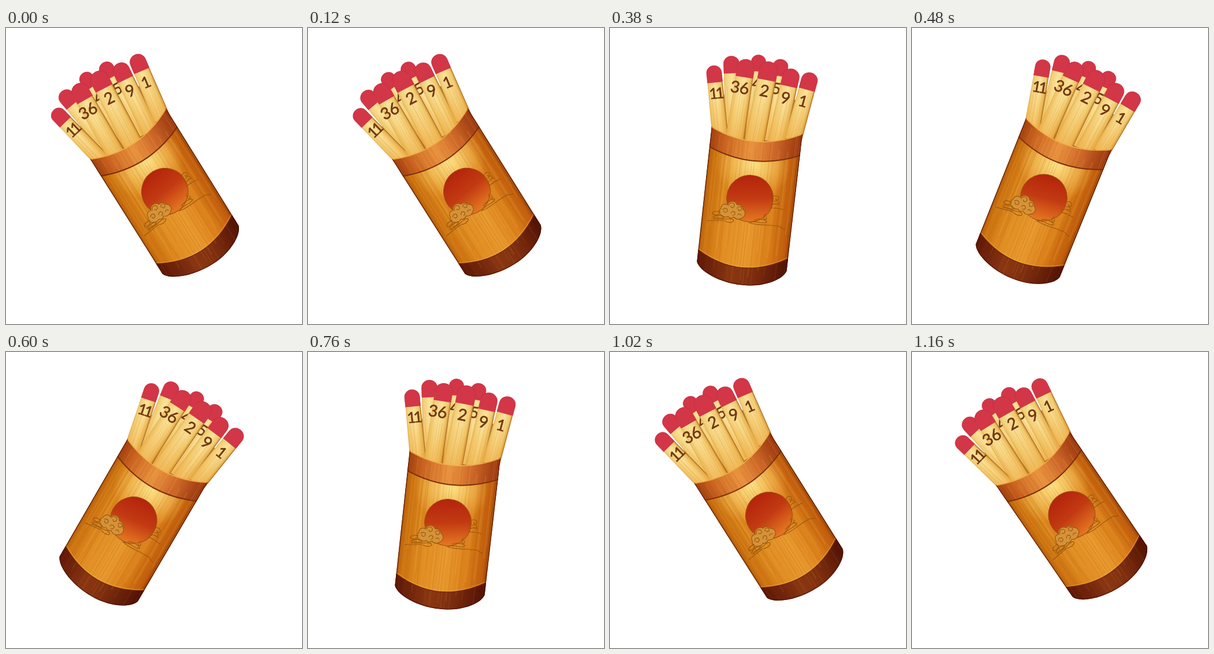
These frames come from a looping animation (512 px wide and 512 px high, 1180 ms). An HTML page:

```html
<!DOCTYPE html>
<html>
<head>
<meta charset="utf-8">
<style>
  html, body { margin: 0; width: 100%; height: 100%; overflow: hidden; background: #fff; }
  svg { display: block; width: 100vw; height: 100vh; }
  text { font-family: Lato, "Open Sans", sans-serif; fill: #70360f; stroke: #70360f; stroke-width: .6; text-anchor: middle; }
</style>
</head>
<body>
<svg viewBox="0 0 512 512">
  <defs>
    <linearGradient id="wood">
      <stop offset="0" stop-color="#e0b056"/><stop offset=".12" stop-color="#f3cf78"/>
      <stop offset=".5" stop-color="#fbe39a"/><stop offset=".85" stop-color="#f0c86c"/>
      <stop offset="1" stop-color="#bf7c28"/>
    </linearGradient>
    <linearGradient id="depth" x2="0" y2="1">
      <stop offset=".4" stop-color="#f0a028" stop-opacity="0"/>
      <stop offset="1" stop-color="#e89a28" stop-opacity=".5"/>
    </linearGradient>
    <linearGradient id="body">
      <stop offset="0" stop-color="#a04a08"/><stop offset=".04" stop-color="#cb7210"/>
      <stop offset=".25" stop-color="#de8a20"/><stop offset=".5" stop-color="#e8992e"/>
      <stop offset=".75" stop-color="#da7f1a"/><stop offset=".95" stop-color="#c05c0c"/>
      <stop offset="1" stop-color="#8e3a05"/>
    </linearGradient>
    <radialGradient id="glow" gradientUnits="userSpaceOnUse" cx="0" cy="0" r="1"
      gradientTransform="translate(6 -8) scale(66 62)">
      <stop offset="0" stop-color="#fde488"/><stop offset=".4" stop-color="#fbd878" stop-opacity=".7"/>
      <stop offset="1" stop-color="#f8c860" stop-opacity="0"/>
    </radialGradient>
    <linearGradient id="rim">
      <stop offset="0" stop-color="#a0400f"/><stop offset=".15" stop-color="#c8601f"/>
      <stop offset=".45" stop-color="#ea9440"/><stop offset=".7" stop-color="#d06a2a"/>
      <stop offset="1" stop-color="#98340e"/>
    </linearGradient>
    <linearGradient id="base">
      <stop offset="0" stop-color="#5c1606"/><stop offset=".4" stop-color="#8a3612"/>
      <stop offset=".65" stop-color="#7c2c0e"/><stop offset="1" stop-color="#501104"/>
    </linearGradient>
    <linearGradient id="sun" x1=".45" y1="0" x2=".58" y2="1">
      <stop offset="0" stop-color="#b4240c"/><stop offset=".5" stop-color="#c23a12"/>
      <stop offset="1" stop-color="#e67a22"/>
    </linearGradient>
    <clipPath id="tubeClip"><path d="M-73-64Q6-28 85-69L84 170C78 188 44 203 10 203C-30 203-66 187-72 171Z"/></clipPath>
  </defs>
  <g id="cup">
    <path d="M187 115L335 125L328 200L182 195Z" fill="#b8792c"/>
    <g id="sticks"></g>
    <g transform="translate(241 242) rotate(6.4)">
      <g clip-path="url(#tubeClip)">
        <path d="M-73-40H85V185H-73Z" fill="url(#body)"/>
        <path d="M-73-40H85V80H-73Z" fill="url(#glow)"/>
        <path d="M-73-64Q6-28 85-69V-31Q6 4-73-29Z" fill="url(#rim)"/>
        <path d="M-73 150Q6 197 85 148V210H-73Z" fill="url(#base)"/>
        <g id="grain"></g>
        <g fill="none">
          <path d="M-73-64Q6-28 85-69" stroke="#f0b04a" stroke-width="3"/>
          <path d="M-73-29Q6 4 85-31" stroke="#7a2e0a" stroke-width="2"/>
          <path d="M-73 148Q6 195 85 146" stroke="#f0ae3c" stroke-width="1.5" opacity=".45"/>
          <path d="M-73 150Q6 197 85 148" stroke="#6a2206" stroke-width="1.2"/>
          <path d="M85-69L84 170C78 188 44 203 10 203C-30 203-66 187-72 171L-73-64" stroke="#420d03" stroke-width="3" opacity=".6"/>
        </g>
      </g>
      <circle cx="7" cy="52.5" r="40.3" fill="url(#sun)" stroke="#9a4a0c"/>
    </g>
    <g transform="translate(-1 -4)" fill="none" stroke="#9a580e" stroke-width="1.2" stroke-linecap="round">
      <path fill="#d59238" d="M194 328a7 7 0 0 1-1-12a7 7 0 0 1 11-6a9 9 0 0 1 17 0a8 8 0 0 1 10 8a8 8 0 0 1-1 14q-8 6-15-1q-5 4-10-1q-5 3-11-2z"/>
      <path d="M206 311q2-6 8-4q4 3 1 7q-4 2-5-2M221 316q2-5 7-2q2 4-2 6q-4 0-3-3M196 318q4-4 8 0q1 5-4 5q-3-1-2-3M210 324q3-5 7-1q1 5-4 5M222 327q4-3 6 1"/>
      <path d="M192 322q-12-3-14 3q2 4 12 1M179 331q8-5 18-1q4 3-6 3q-10-2-11 1q12 1 29 0q8 1 5 5q-6 3-14-1M168 337h30"/>
      <path d="M282 302q0-8 6-8q6 1 5 6q-4 3-6-1M285 304q7-3 8 2q-1 4-6 2M279 311q8-5 15-1M278 315q12 0 23 3"/>
      <path d="M270 326q-5 4-2 9q5 1 3-4M250 336q10-3 20 1q6 4-6 4q-14-3-22 0q14 4 34 4l18 2q4 4 9 5"/>
    </g>
  </g>
</svg>
<script>
const el = id => document.getElementById(id);
let seed = 7;
const rnd = () => (seed = seed * 16807 % 2147483647) / 2147483647;

// A stick runs from the centre of its head (x, y) down to (x2, y2).
function stick(x, y, x2, y2, w, label = "", labelY = 36, labelX = 0, size = 28, gap = 0) {
  const len = Math.hypot(x2 - x, y2 - y) + 10, r = w / 2;
  const turn = Math.atan2(x - x2, y2 - y) * 180 / Math.PI;
  const shaft = `M${-r} 0H${r}L${r + 1} ${len}H${-r - 1}Z`;
  let lines = "";
  for (let i = 0; i < 5; i++) {
    const gx = (rnd() - .5) * w * .85;
    lines += `M${gx} ${20 + rnd() * 40}V${len}`;
  }
  return `<g transform="translate(${x} ${y}) rotate(${turn})">
    <path d="${shaft}" fill="url(#wood)"/><path d="${shaft}" fill="url(#depth)"/>
    <path d="${lines}" stroke="#c98a2c" opacity=".22"/>
    <path d="M${r - .5} 18L${r + .5} ${len}" stroke="#8a4a14" opacity=".5"/>
    <path d="M${-r} 17V0A${r} ${r - 1} 0 0 1 ${r} 0V17Z" fill="#d23647" stroke="#bf2c40" stroke-width=".6"/>
    <text x="${labelX}" y="${labelY + size * .36}" font-size="${size}" letter-spacing="${gap}">${label}</text></g>`;
}

el("sticks").innerHTML =
  stick(257, 58, 248, 185, 25, "4", 38, -1, 26) +
  stick(295, 66, 276, 185, 26, "5", 39, -1, 27) +
  stick(210, 61, 214, 182, 27) +
  stick(180, 77, 190, 180, 26, "11", 36, -1, 26, -4) +
  stick(235, 68, 217, 184, 30, "36", 36, -5, 28) +
  stick(274, 73, 252, 186, 32, "2", 36, 0, 28) +
  stick(313, 84, 290, 187, 29, "9", 38, -1, 28) +
  stick(345, 90, 319, 184, 28, "1", 38, -1, 27);

let grain = "";
for (let x = -71; x < 86; x += 2.5) {
  const color = rnd() < .6 ? "#a04a06" : "#ffd060", top = -66 + rnd() * 60;
  grain += `<path d="M${x + rnd() * 2} ${top}V${top + 120 + rnd() * 160}" stroke="${color}"
    stroke-width="${.8 + rnd() * 1.5}" opacity="${.04 + rnd() * .13}"/>`;
}
el("grain").innerHTML = grain;

// Swing: [step, degrees], joined by smooth curves.
const keys = [[-1, -34.3], [0, -32], [1.5, -29.8], [4.5, -33.2], [12, -17.6], [19, 6.4], [27, 30.2], [28, 32.4]];
const secant = i => (keys[i + 1][1] - keys[i][1]) / (keys[i + 1][0] - keys[i][0]);
function slope(i) {
  if (i === 0) return secant(0);
  if (i === keys.length - 1) return secant(i - 1);
  const a = secant(i - 1), b = secant(i);
  return a * b > 0 ? (a + b) / 2 : 0;
}
function angleAt(step) {
  let i = 0;
  while (i < keys.length - 2 && step > keys[i + 1][0]) i++;
  const [s0, a0] = keys[i], [s1, a1] = keys[i + 1], h = s1 - s0, u = (step - s0) / h;
  const v = 1 - u;
  return a0 * v * v * (1 + 2 * u) + a1 * u * u * (3 - 2 * u) + h * u * v * (v * slope(i) - u * slope(i + 1));
}

const start = performance.now();
function draw() {
  const tick = Math.floor((performance.now() - start) % 1180 / 20);
  const angle = angleAt(28.5 - Math.abs(tick - 28.5));
  el("cup").setAttribute("transform", `rotate(${angle - 6.4} 241 242)`);
  requestAnimationFrame(draw);
}
draw();
</script>
</body>
</html>
```
